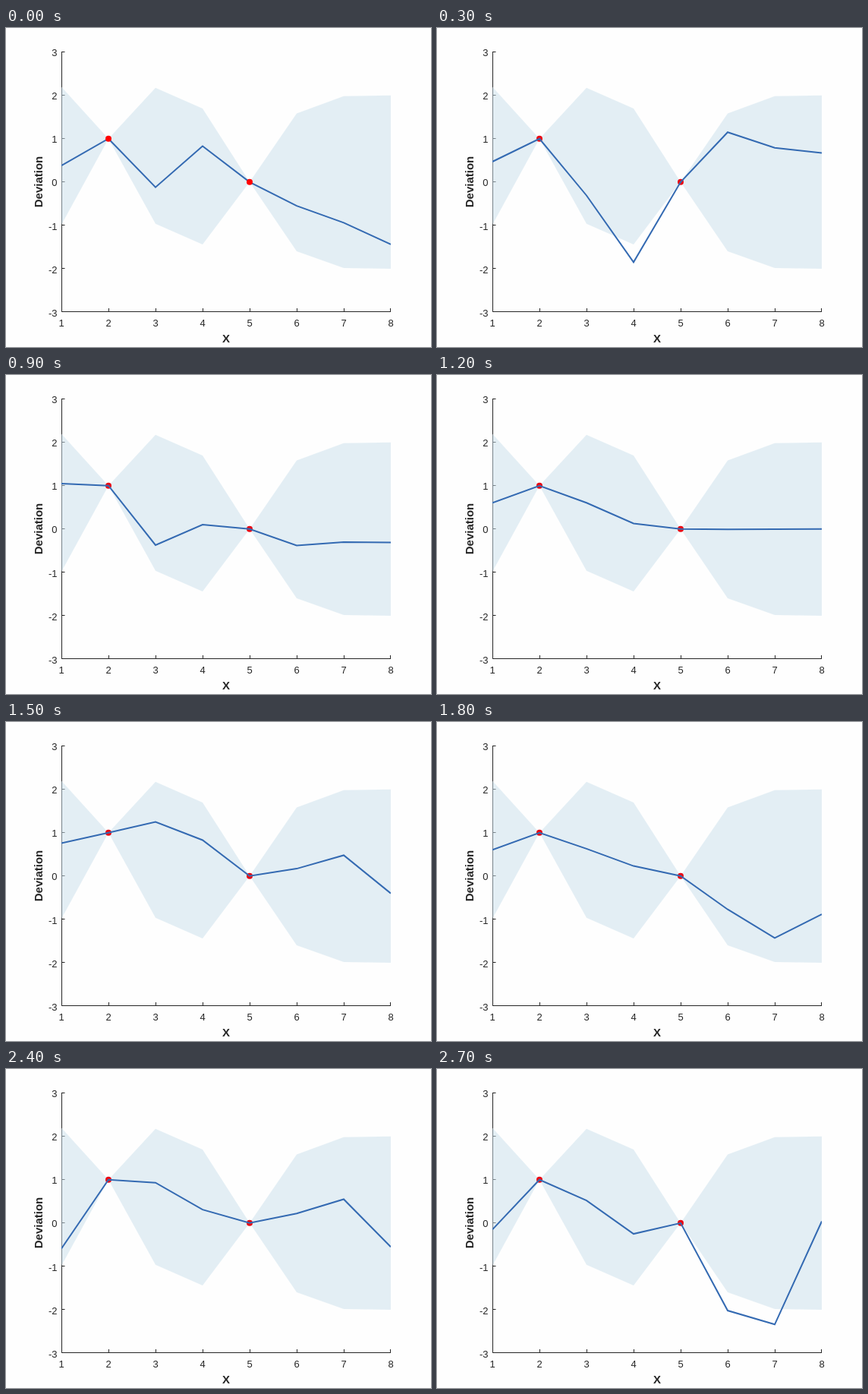
Write an HTML page with a canvas that moves like this. It is 560 px wide and 420 px high and loops after 3 s.

```html
<!DOCTYPE html>
<html lang="en">
<head>
<meta charset="utf-8">
<title>Deviation</title>
<style>
html, body { margin: 0; width: 100%; height: 100%; overflow: hidden; background: #fefefe; }
canvas { display: block; }
</style>
</head>
<body>
<canvas id="chart" width="560" height="420"></canvas>
<script>
const ctx = document.getElementById('chart').getContext('2d');
const STEP = 300;
const INK = '#262626';
const FONT = '"Liberation Sans", Arial, sans-serif';

const grid = Array.from({ length: 8 }, (_, i) => i + 1);
const observed = { 2: 1, 5: 0 };

// Key points of each draw; the process fills in the rest
const draws = [
  { 1: 0.38, 3: -0.12, 4: 0.83, 6: -0.55, 7: -0.94, 8: -1.44 },
  { 1: 0.47, 3: -0.31, 4: -1.85, 6: 1.15, 7: 0.79, 8: 0.67 },
  { 7: -0.73 },
  { 1: 1.05, 3: -0.37, 4: 0.1, 6: -0.38, 7: -0.3, 8: -0.31 },
  {},
  { 1: 0.76, 3: 1.25, 4: 0.83, 6: 0.17, 7: 0.48, 8: -0.4 },
  { 7: -1.43 },
  { 1: 0.46, 3: 1.78, 4: 0.91, 6: 1.09, 7: 1.96, 8: 0.96 },
  { 1: -0.59, 3: 0.93, 4: 0.31, 6: 0.22, 7: 0.55, 8: -0.55 },
  { 1: -0.15, 3: 0.52, 4: -0.25, 6: -2.02, 7: -2.34, 8: 0.04 }
];

// Gaussian process with unit length scale, conditioned on one point at a time
function condition(points) {
  let mean = grid.map(() => 0);
  let cov = grid.map(a => grid.map(b => Math.exp(-((a - b) ** 2) / 2)));
  for (const [x, y] of Object.entries(points)) {
    const k = x - 1;
    const error = y - mean[k];
    const row = cov[k];
    const gain = row.map(c => c / row[k]);
    mean = mean.map((m, i) => m + gain[i] * error);
    cov = cov.map((r, i) => r.map((c, j) => c - gain[i] * row[j]));
  }
  const sd = cov.map((r, i) => Math.sqrt(Math.max(0, r[i])));
  return { mean, sd };
}

const px = x => 73 + 62 * (x - 1);
const py = y => 202.8 - 57.05 * y;
const snap = v => Math.floor(v) + 0.5;
const toPoints = values => values.map((v, i) => [px(i + 1), py(v)]);

const { mean, sd } = condition(observed);
const edge = side => toPoints(mean.map((m, i) => m + side * 2 * sd[i]));
const band = edge(1).concat(edge(-1).reverse());
const lines = draws.map(keys => toPoints(condition({ ...observed, ...keys }).mean));

function trace(points) {
  ctx.beginPath();
  points.forEach(p => ctx.lineTo(...p));
}

function stroke(points, color, width) {
  trace(points);
  ctx.strokeStyle = color;
  ctx.lineWidth = width;
  ctx.stroke();
}

function label(text, x, y, align, font) {
  ctx.fillStyle = INK;
  ctx.font = font + ' ' + FONT;
  ctx.textAlign = align;
  ctx.fillText(text, x, y);
}

function drawAxes() {
  stroke([[73.5, 31], [73.5, 373.5], [507, 373.5]], INK, 1);
  for (const x of grid) {
    const at = Math.min(snap(px(x)), 506.5);
    stroke([[at, 373.5], [at, 369]], INK, 1);
    label(x, px(x), 393, 'center', '13px');
  }
  for (let y = -3; y <= 3; y++) {
    const at = snap(py(y));
    stroke([[73.5, at], [77.5, at]], INK, 1);
    label(y, 67.5, Math.round(py(y) + 5.65), 'right', '13px');
  }
  label('X', 290, 414, 'center', 'bold 15px');
  ctx.save();
  ctx.translate(48, 202.5);
  ctx.rotate(-Math.PI / 2);
  label('Deviation', 0, 0, 'center', 'bold 15px');
  ctx.restore();
}

function drawBand() {
  trace(band);
  ctx.fillStyle = 'rgba(202, 224, 236, 0.5)';
  ctx.fill();
}

function drawDots(color) {
  ctx.fillStyle = color;
  for (const [x, y] of Object.entries(observed)) {
    ctx.beginPath();
    ctx.arc(px(x), py(y), 4, 0, 2 * Math.PI);
    ctx.fill();
  }
}

function drawLine(points) {
  ctx.save();
  ctx.beginPath();
  ctx.rect(73, 31, 434, 343);
  ctx.clip();
  stroke(points, '#346ab2', 2);
  ctx.restore();
}

function draw(index) {
  ctx.fillStyle = '#fefefe';
  ctx.fillRect(0, 0, 560, 420);
  drawAxes();
  drawBand();
  // The first line lies under the dots, the others over them
  if (index) drawDots('#ea0a14');
  drawLine(lines[index]);
  if (!index) drawDots('#ff0000');
}

const start = performance.now();
function tick() {
  draw(Math.floor((performance.now() - start) / STEP) % lines.length);
  requestAnimationFrame(tick);
}
tick();
</script>
</body>
</html>
```
